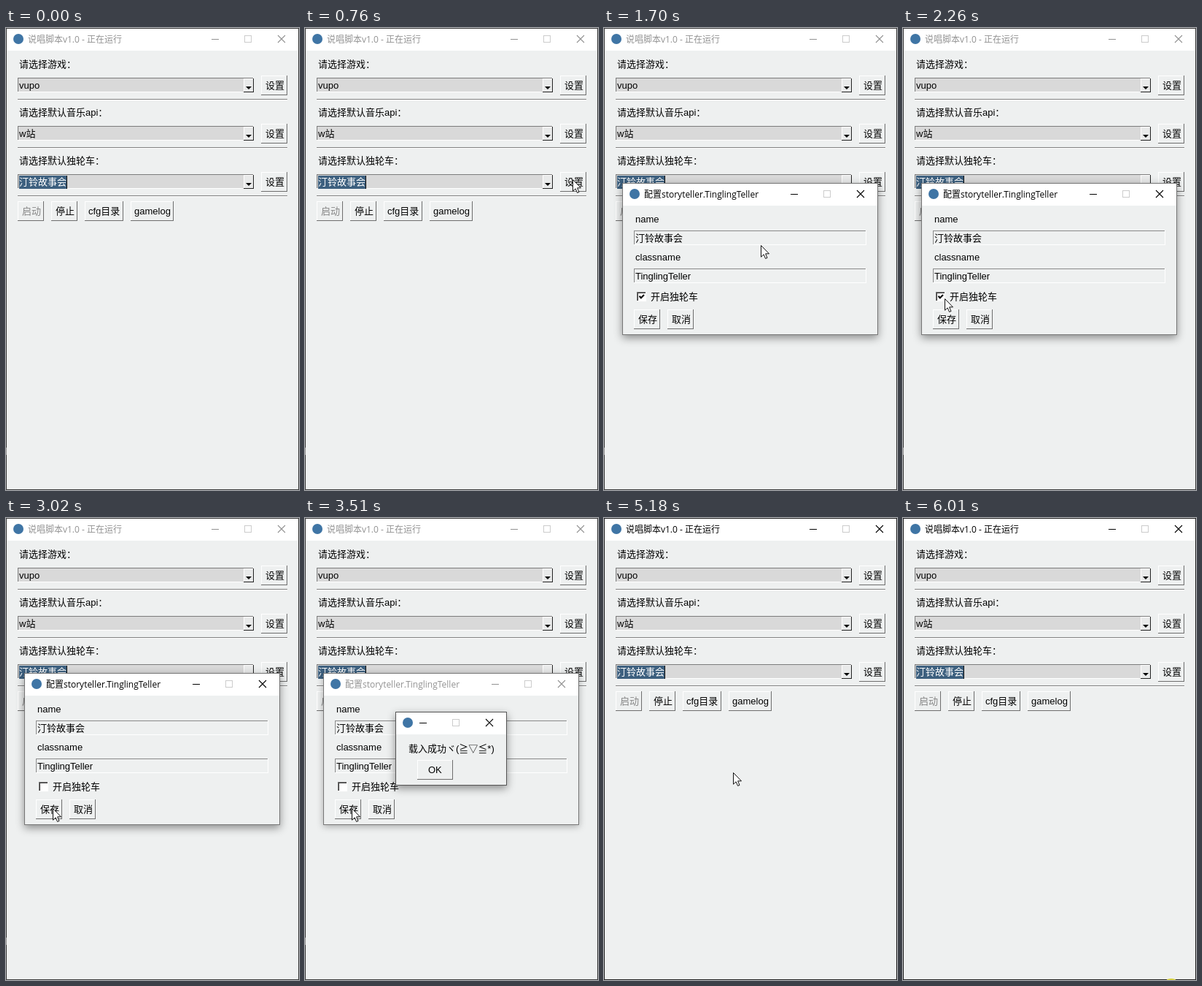
Recreate the animation shown at these times as an HTML page. Size 402 by 632 pixels, loop 6080 ms.

```html
<!DOCTYPE html>
<html lang="zh-CN">
<head>
<meta charset="utf-8">
<style>
html, body { margin: 0; width: 100%; height: 100%; overflow: hidden; background: #eef0f0; }
svg { position: absolute; left: 0; top: 0; display: block; }
text { white-space: pre; font: 13px "Liberation Sans", "Noto Sans CJK SC", "Noto Sans CJK", sans-serif; }
.title { font: 12px "Open Sans", "Noto Sans CJK SC", "Noto Sans CJK", sans-serif; }
rect { shape-rendering: crispEdges; }
.frame { filter: drop-shadow(0 4px 6px rgba(0, 0, 0, .42)); }
.idle .frame { filter: drop-shadow(0 2px 5px rgba(0, 0, 0, .3)); }
</style>
</head>
<body>
<svg id="stage" width="402" height="632" viewBox="0 0 402 632"></svg>
<script>
const LOOP = 6080;
const FACE = '#eef0f0', DARK = '#6e6e6e', GREY = '#8a8a8a', WHITE = '#fff';
const STORY = '汀铃故事会', CLASS = 'TinglingTeller';

const rect = (x, y, w, h, fill, extra = '') =>
  `<rect x="${x}" y="${y}" width="${w}" height="${h}" fill="${fill}" ${extra}/>`;
const text = (x, y, s, fill = '#000', cls = '') =>
  `<text x="${x}" y="${y}" fill="${fill}" class="${cls}">${s}</text>`;
const bevel = (x, y, w, h, light, dark, fill) =>
  rect(x, y, w, h, dark) + rect(x, y, w - 1, h - 1, light) + rect(x + 1, y + 1, w - 2, h - 2, fill);
const button = (x, y, w, label, pad = 6, fill = '#000') =>
  bevel(x, y, w, 27, WHITE, DARK, FACE) + text(x + pad, y + 18, label, fill);
const pressed = (id, x, y, w) =>
  `<g id="${id}">` + rect(x, y, w, 1, DARK) + rect(x, y, 1, 27, DARK) +
  rect(x, y + 26, w, 1, WHITE) + rect(x + w - 1, y, 1, 27, WHITE) + '</g>';
const field = (y, value) =>
  bevel(41, y, 319, 20, GREY, WHITE, FACE) + text(43, y + 15, value);

// Title bar: icon, caption and the three window controls
function titleBar(x, y, w, caption, buttons) {
  const [min, max, close] = buttons, cy = y + 15;
  return rect(x, y, w, 30, WHITE) +
    `<circle cx="${x + 16}" cy="${cy - 1}" r="7" fill="#3f75a5"/>` +
    text(x + 29, cy + 4, caption, 'currentColor', 'title') +
    rect(min, cy - 1, 10, 1, 'currentColor') +
    `<rect x="${max + .5}" y="${cy - 5.5}" width="9" height="9" fill="none" stroke="#ccc"/>` +
    `<path d="M${close} ${cy - 6}l10 10m0 -10l-10 10" stroke="currentColor" stroke-width="1.1"/>`;
}

function combo(y, label, value, selected) {
  const chosen = selected
    ? rect(18, y + 21, 65, 18, '#3d607f') + rect(83, y + 21, 1, 18, '#111') : '';
  return text(18, y + 5, label) +
    bevel(16, y + 19, 324, 20, '#7c7c7c', WHITE, '#d9d9d9') + chosen +
    text(18, y + 34, value, selected ? WHITE : '#000') +
    bevel(326, y + 20, 14, 19, WHITE, '#222', '#e9eaea') +
    `<path d="M329 ${y + 31}h8l-4 4z"/>` +
    button(350, y + 16, 36, '设置') +
    rect(16, y + 48, 370, 1, '#808080') + rect(16, y + 49, 370, 1, WHITE);
}

const windowFrame = (x, y, w, h, border) =>
  rect(x, y, w, h, border, 'class="frame"') + rect(x + 1, y + 1, w - 2, h - 2, FACE);

const mainWindow = '<g id="main">' +
  rect(0, 0, 402, 632, 'currentColor', 'id="edge"') + rect(1, 1, 400, 630, FACE) +
  '<g id="bar">' + titleBar(1, 1, 400, '说唱脚本v1.0 - 正在运行', [282, 327, 373]) + '</g>' +
  combo(49, '请选择游戏：', 'vupo') +
  combo(115, '请选择默认音乐api：', 'w站') +
  combo(181, '请选择默认独轮车：', STORY, true) +
  button(16, 237, 36, '启动', 6, '#858585') + button(62, 237, 36, '停止') +
  button(108, 237, 53, 'cfg目录', 5) + button(171, 237, 59, 'gamelog', 5) +
  pressed('setDown', 350, 197, 36) +
  rect(0, 574, 1, 10, '#999', 'id="nick"') + '</g>';

const dialog = '<g id="dialog">' + windowFrame(25, 212, 351, 208, '#777') +
  titleBar(26, 213, 349, `配置storyteller.${CLASS}`, [256, 301, 347]) +
  text(43, 266, 'name') + field(277, STORY) +
  text(43, 318, 'classname') + field(329, CLASS) +
  bevel(45, 361, 13, 13, '#6a6a6a', WHITE, '#444') + rect(47, 363, 10, 10, WHITE) +
  '<path id="tick" d="M48.5 366.8l2.3 2.4 4.2-4.2" fill="none" stroke="#000" stroke-width="2"/>' +
  text(64, 372, '开启独轮车') +
  button(41, 385, 36, '保存') + button(87, 385, 36, '取消') +
  pressed('saveDown', 41, 385, 36) + '</g>';

const popup = '<g id="popup">' + windowFrame(124, 265, 153, 101, '#555') +
  titleBar(125, 266, 151, '', [157, 202, 248]) +
  text(142, 320, '载入成功ヾ(≧▽≦*)') +
  button(154, 331, 49, 'OK', 15) + pressed('okDown', 154, 331, 49) + '</g>';

const pointer = '<path id="pointer" d="M.5 .5V16.2L4.1 12.8 6.6 18.4 9 17.4 6.6 11.8H11.5Z" fill="#fff" stroke="#111"/>';
const glow = '<ellipse id="glow" cx="368" cy="632.5" rx="6.5" ry="2.5" fill="#d6d13f"/>';

const stage = document.getElementById('stage');
stage.innerHTML = mainWindow + dialog + popup + pointer + glow;
const el = id => document.getElementById(id);
const show = (id, on) => { el(id).style.display = on ? '' : 'none'; };

// Pointer moves: start, end, number of steps, points
const MOVES = [
  [70, 620, 9, [[396, 587], [370, 211]]],
  [690, 760, 2, [[369, 209], [367, 207]]],
  [1430, 1980, 9, [[367, 207], [63, 386]]],
  [2050, 2330, 5, [[58, 379], [54, 374], [55, 371], [57, 370], [57, 368]]],
  [2670, 3020, 6, [[57, 369], [64, 397]]],
  [3900, 4390, 8, [[66, 396], [175, 349]]],
  [5180, 5740, 9, [[177, 348], [357, 628]]]
];
const ease = u => u * u * (3 - 2 * u);

function pointerAt(t) {
  const move = MOVES.filter(m => m[0] <= t).pop();
  if (!move || t >= 5810) return null;
  const [a, b, n, pts] = move;
  const step = Math.min(n - 1, Math.floor((t - a + 5) / ((b - a) / (n - 1))));
  if (pts.length === n) return pts[step];
  const u = ease(step / (n - 1));
  return pts[0].map((v, i) => Math.round(v + (pts[1][i] - v) * u));
}

function render(t) {
  const within = (a, b) => t >= a && t < b;
  const active = within(1160, 1430) || t >= 4590;
  const popupOpen = within(3510, 4590);
  el('bar').style.color = active ? '#000' : '#929292';
  el('edge').style.color = active ? '#222' : '#3c3c3c';
  show('nick', !active);
  show('setDown', within(1160, 1290));
  show('dialog', within(1430, 4590));
  el('dialog').style.color = popupOpen ? '#929292' : '#000';
  el('dialog').setAttribute('class', popupOpen ? 'idle' : '');
  show('tick', t < 2470);
  show('saveDown', within(3370, 3440));
  show('popup', popupOpen);
  show('okDown', within(4520, 4590));
  const p = pointerAt(t);
  show('pointer', p);
  if (p) el('pointer').setAttribute('transform', `translate(${p[0]} ${p[1]})`);
  show('glow', t >= 6010);
}

const start = performance.now();
function tick() {
  render((performance.now() - start) % LOOP);
  requestAnimationFrame(tick);
}
tick();
</script>
</body>
</html>
```
